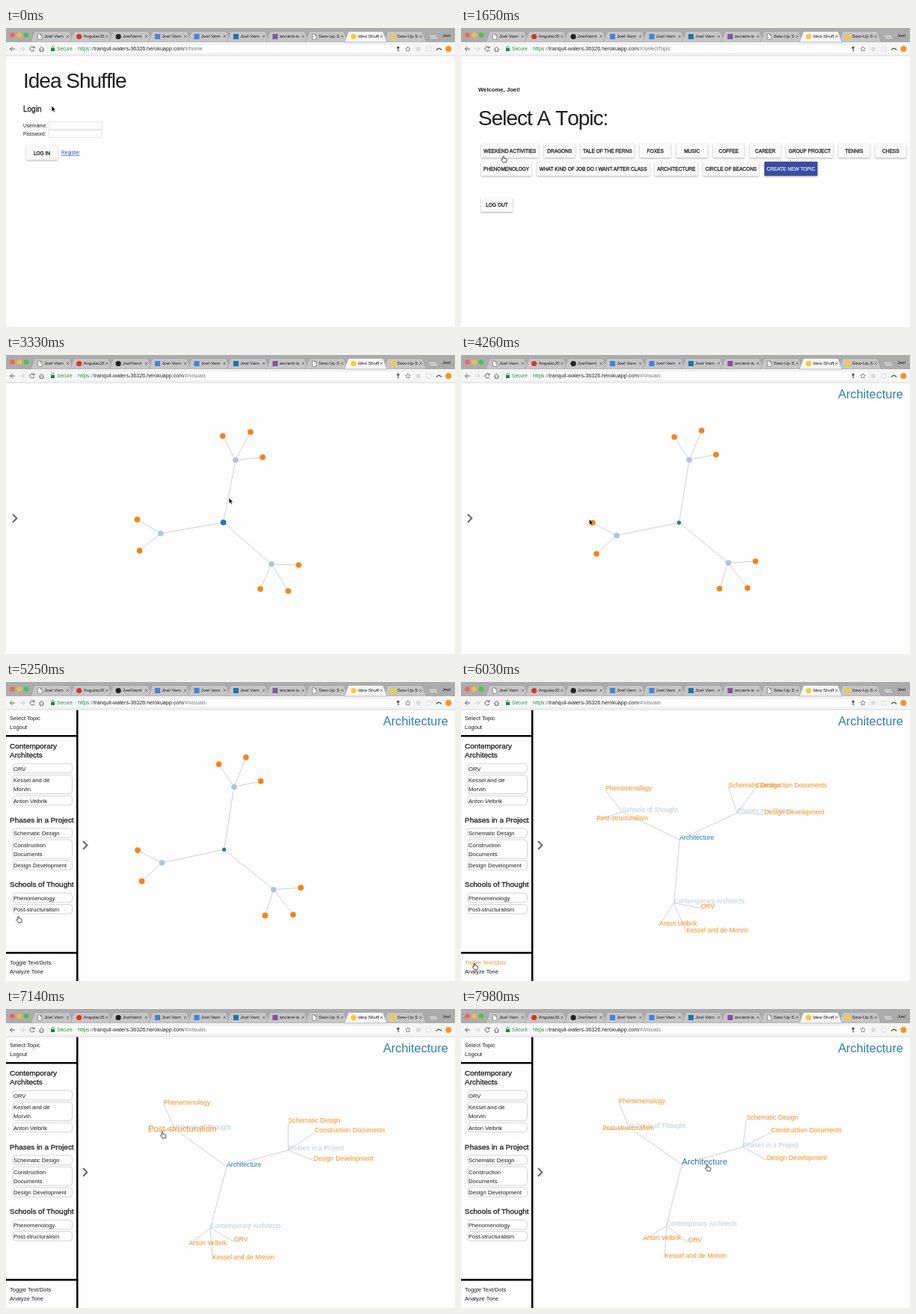
Recreate the animation shown at these times as an HTML page. Size 600 by 400 pixels, loop 8 s.

```html
<!DOCTYPE html>
<html lang="en">
<head>
<meta charset="utf-8">
<title>Idea Shuffle</title>
<style>
html, body { margin: 0; width: 100%; height: 100%; overflow: hidden; background: #fefefe; }
svg { font-family: "Liberation Sans", Arial, sans-serif; }
#stage { display: block; width: 100%; height: 100%; }
text { fill: #1e1e1e; white-space: pre; }
.medium { stroke: #1e1e1e; stroke-width: .28; }
.title { font-size: 28px; font-kerning: none; letter-spacing: -1px; }
.button { fill: #fafafa; filter: drop-shadow(0 1px 1px rgba(0, 0, 0, .32)); }
.button.primary { fill: #3a4ba2; }
.light { fill: #fefefe; stroke: #fefefe; stroke-width: .15; }
.box { fill: #fefefe; stroke: #c8c8c8; stroke-width: .8; }
.field { fill: #fefefe; stroke: #dedee2; stroke-width: .8; }
.icon { fill: none; stroke: #606060; stroke-width: 1; }
</style>
</head>
<body>
<svg id="stage" viewBox="0 0 600 400" preserveAspectRatio="none"></svg>
<script>
const LOOP = 8000;
const TOPICS = 1400, SHOW = 2490, PICK = 3640, OPEN = 4950, TOGGLE = 5700;
const stage = document.getElementById('stage');

// ---- markup helpers ----
const text = (x, y, size, str, attrs = '') =>
  `<text x="${x}" y="${y}" font-size="${size}" ${attrs}>${str}</text>`;
const rect = (x, y, w, h, attrs = '') =>
  `<rect x="${x}" y="${y}" width="${w}" height="${h}" ${attrs}/>`;
const circle = (x, y, r, fill) => `<circle cx="${x}" cy="${y}" r="${r}" fill="${fill}"/>`;
const path = (d, attrs = 'class="icon"') => `<path d="${d}" ${attrs}/>`;
const group = (id, body) => `<g id="${id}">${body}</g>`;

const ruler = document.createElement('canvas').getContext('2d');
ruler.font = '6.55px "Liberation Sans", Arial, sans-serif';

// Buttons flow from the left, each as wide as its label with a minimum.
function buttonRow(y, labels) {
  let x = 27;
  return labels.map(label => {
    const w = Math.max(42, ruler.measureText(label).width + 6.2), primary = label.startsWith('CREATE');
    const out = rect(x, y, w, 19, `rx="1" class="button ${primary ? 'primary' : ''}"`) +
      text(x + w / 2, y + 12.3, 6.55, label, `text-anchor="middle" class="${primary ? 'light' : 'medium'}"`);
    x += w + 7;
    return out;
  }).join('');
}

// ---- browser frame ----
const tabs = [
  ['Joel Varn', 'page'], ['AngularJS', 'dot', '#d8322e'], ['JoelVarnl', 'dot', '#222'],
  ['Joel Varn', 'square', '#4283e0'], ['Joel Varn', 'square', '#4283e0'],
  ['Joel Varn', 'square', '#1478ad'], ['ancient-is', 'square', '#7c5a9e'],
  ['Sew-Up Shed', 'page'], ['Idea Shuffle', 'dot', '#f2cf2c'], ['Sew-Up Shed', 'dot', '#f2cf2c']
];
const ACTIVE = 8;
const favicons = {
  page: () => path('M7.5 7.8h3.4l2 2v5.4H7.5zM10.9 7.8v2h2', 'fill="#fefefe" stroke="#707070" stroke-width=".7"'),
  dot: color => circle(10.3, 11.5, 3.6, color),
  square: color => rect(6.8, 8, 7, 7, `fill="${color}"`)
};

function tab(i) {
  const [label, shape, color] = tabs[i];
  return `<g transform="translate(${35 + i * 52.4} 0)">` +
    path('M-2 19L3 5.5Q3.5 4.5 5 4.5H48Q49.5 4.5 50 5.5L55 19Z',
      `fill="${i === ACTIVE ? '#f5f5f6' : '#c6c6c6'}" stroke="#969696" stroke-width=".6"`) +
    favicons[shape](color) +
    `<svg x="16" y="4" width="28" height="15">${text(0, 9.3, 6.2, label)}</svg>` +
    path('M46 9.8l3 3m0-3l-3 3', 'stroke="#555" stroke-width=".8"') + '</g>';
}

const browser = rect(0, 0, 600, 19, 'fill="#acacac"') +
  ['#f6625a', '#f3be3c', '#49c34b'].map((color, i) => circle(8.5 + 9.25 * i, 9.5, 3.3, color)).join('') +
  tabs.map((_, i) => i === ACTIVE ? '' : tab(i)).join('') +
  path('M564 8.5h11l3 7h-11z', 'fill="#c6c6c6" stroke="#969696" stroke-width=".6"') +
  text(583, 11.8, 6, 'Joel') +
  rect(0, 19, 600, 18, 'fill="#f5f5f6"') + tab(ACTIVE) +
  rect(0, 36.6, 600, .8, 'fill="#d0d0d0"') +
  rect(56, 21.8, 489, 12.4, 'rx="2" fill="#fefefe" stroke="#dcdcdc" stroke-width=".6"') +
  path('M12 28H5.5m3-3l-3 3 3 3') +
  path('M18.5 28H25m-3-3l3 3-3 3', 'fill="none" stroke="#ccc"') +
  path('M37.3 26A3 3 0 1 0 37.8 29M38 24.3v2.4h-2.4') +
  path('M44.3 28.3l3.2-3 3.2 3M45.4 28v3.2h4.2V28') +
  rect(60, 27, 5, 4, 'fill="#168a3a"') +
  path('M61 27v-1.2a1.5 1.5 0 0 1 3 0V27', 'fill="none" stroke="#168a3a" stroke-width=".9"') +
  text(68, 30.4, 6.6, 'Secure', 'style="fill:#168a3a"') +
  rect(92, 24, .6, 8, 'fill="#d4d4d4"') +
  '<text x="96" y="30.4" font-size="7.12"><tspan fill="#168a3a">https</tspan><tspan fill="#777">://</tspan>' +
  'tranquil-waters-36326.herokuapp.com<tspan id="address" fill="#777"></tspan></text>' +
  circle(524, 26.3, 1.7, '#555') + path('M524 27v4.5m0-1.5h1.5') +
  path('M537 24.6l1 2.2 2.4.3-1.8 1.6.5 2.4-2.1-1.2-2.1 1.2.5-2.4-1.8-1.6 2.4-.3z', 'fill="none" stroke="#606060" stroke-width=".7"') +
  circle(551, 28, 3, '#dcdce0') +
  rect(562, 25, 6, 6, 'fill="none" stroke="#ccc" stroke-dasharray="1 1"') +
  path('M575 29.5q3.5-4.5 7 0', 'fill="none" stroke="#456b3c" stroke-width="1.3"') +
  circle(591.3, 28, 4, '#f9951c');

// ---- pages ----
const login = text(23, 80, 28, 'Idea Shuffle', 'class="title"') +
  text(23, 112.3, 10, 'Login', 'class="medium"') +
  text(23, 133, 6.55, 'Username:') + rect(57.5, 125.5, 71, 10, 'class="field"') +
  text(23, 144, 6.55, 'Password:') + rect(56.5, 136.7, 71, 10, 'class="field"') +
  text(59.5, 133, 6.5, '', 'id="user"') + text(58.5, 144.3, 6.5, '', 'id="pass"') +
  buttonRow(157.5, ['LOG IN']) +
  text(74, 169.3, 6.58, 'Register', 'style="fill:#2450cc" text-decoration="underline"');

const topics = text(23, 84.7, 7.7, 'Welcome, Joel!', 'font-weight="bold"') +
  text(23, 130, 28, 'Select A Topic:', 'class="title"') +
  buttonRow(154.5, ['WEEKEND ACTIVITIES', 'DRAGONS', 'TALE OF THE FERNS', 'FOXES', 'MUSIC', 'COFFEE',
    'CAREER', 'GROUP PROJECT', 'TENNIS', 'CHESS']) +
  buttonRow(178.8, ['PHENOMENOLOGY', 'WHAT KIND OF JOB DO I WANT AFTER CLASS', 'ARCHITECTURE',
    'CIRCLE OF BEACONS', 'CREATE NEW TOPIC']) +
  buttonRow(227, ['LOG OUT']);

const ideas = [
  ['Contemporary Architects', ['ORV', 'Kessel and de Morvin', 'Anton Velbrik']],
  ['Phases in a Project', ['Schematic Design', 'Construction Documents', 'Design Development']],
  ['Schools of Thought', ['Phenomenology', 'Post-structuralism']]
];

// Breaks a long label before its last word.
const wrap = (str, max) => str.length > max ? str.split(/ (?=\S+$)/) : [str];

function outline() {
  const lineStep = 12.5;
  let y = 65.6, out = '';
  for (const [name, items] of ideas) {
    y += 22.9;
    wrap(name, 20).forEach((line, i) => {
      if (i) y += lineStep;
      out += text(5, y, 9.95, line, 'class="medium"');
    });
    y += 8.1;
    for (const label of items) {
      const lines = wrap(label, 18), h = lines.length * lineStep;
      out += rect(9, y, 79.5, h, 'rx="4" class="box"') +
        lines.map((line, i) => text(10, y + 9.5 + i * 12.2, 7.65, line)).join('');
      y += h + 2.8;
    }
    y -= 2.8;
  }
  return out;
}

const sidebar = rect(0, 37.4, 94, 363, 'fill="#fefefe"') +
  rect(94, 37.4, 2.5, 363) + rect(0, 71, 95, 2.4) + rect(0, 361, 95, 2.6) +
  text(5, 51, 7.6, 'Select Topic') + text(5, 63, 7.6, 'Logout') + outline() +
  text(5, 377.6, 7.5, 'Toggle Text/Dots', 'id="toggle"') + text(5, 389.6, 7.5, 'Analyze Tone');

// ---- idea graph: a centre, three hubs around it, leaves fanned out from each hub ----
const dotColors = ['#1f77b4', '#aec8d6', '#fd820e'];
const textColors = ['#2a7cac', '#bccbd2', '#f8901c'];
const nodes = [{ name: 'Architecture', level: 0 }];
ideas.forEach(([name, items], h) => {
  const hub = nodes.push({ name, level: 1, parent: 0, index: h }) - 1;
  items.forEach((item, index) =>
    nodes.push({ name: item, level: 2, parent: hub, index, count: items.length }));
});

const mix = (a, b, k) => a + (b - a) * k;
const progress = (t, a, b) => Math.min(1, Math.max(0, (t - a) / (b - a)));
const easeOut = k => 1 - (1 - k) ** 3;
const easeInOut = k => k * k * (3 - 2 * k);

// time, centre x, centre y, turn of the hubs, lean of the fans, scale
const dotPoses = [[SHOW, 290.5, 224, -130, 40, .25], [3330, 290.5, 224, -79, 17, 1], [5250, 291.5, 224.2, -81, 13, 1]];
const textPoses = [[TOGGLE, 292, 211, 65, -60, .35], [6030, 292, 211, 95, -28, 1],
  [7140, 295, 211, 105, -19, 1], [7980, 295, 208, 104, -11, 1]];

function poseAt(t, poses) {
  const next = poses.findIndex(pose => pose[0] > t);
  if (next < 0) return poses[poses.length - 1];
  const from = poses[next - 1], to = poses[next], k = easeOut(progress(t, from[0], to[0]));
  return from.map((v, i) => mix(v, to[i], k));
}

function spotsAt(t) {
  const words = t >= TOGGLE, side = words ? -1 : 1;
  const [, cx, cy, turn, lean, scale] = poseAt(t, words ? textPoses : dotPoses);
  const spots = [{ x: cx, y: cy, angle: turn }];
  for (const { level, parent, index, count } of nodes.slice(1)) {
    const base = spots[parent];
    let angle, reach;
    if (level === 1) {
      angle = turn + side * index * (index === 2 ? 124.5 : 120);
      reach = 85;
    } else {
      angle = base.angle + (count === 3 ? lean + (index - 1) * 56 : lean / 3 + (.5 - index) * 70);
      reach = count === 3 && index === 1 ? 42.5 : 36.5;
    }
    const rad = angle * Math.PI / 180;
    spots.push({ x: base.x + Math.cos(rad) * reach * scale, y: base.y + Math.sin(rad) * reach * scale, angle });
  }
  return spots;
}

// ---- pointer stops: arrival, departure, tip x, tip y, over something clickable ----
const stops = [
  [0, 30, 61, 104], [250, 540, 88, 128], [700, 1000, 66, 139], [1250, 1450, 48, 166, true],
  [1650, 1660, 56.5, 171, true], [2250, SHOW, 290, 187, true], [3330, 3340, 298, 191],
  [3600, 3900, 291, 222, true], [4700, 5000, 11, 216, true], [5200, 5270, 16.5, 313, true],
  [5550, 6570, 18, 376, true], [7120, 7380, 209, 164, true], [7850, LOOP, 329, 208, true]
];

function pointerAt(t) {
  const i = stops.findLastIndex(stop => t >= stop[0]);
  const from = stops[i], to = stops[i + 1] || from;
  const k = to === from ? 0 : easeInOut(progress(t, from[1], to[0]));
  const x = mix(from[2], to[2], k), y = mix(from[3], to[3], k);
  const near = k < .5 ? from : to;
  return { x, y, hand: !!near[4] && Math.hypot(x - near[2], y - near[3]) < 14 };
}

// ---- build once ----
stage.innerHTML = rect(0, 0, 600, 400, 'fill="#fefefe"') +
  group('login', login) + group('topics', topics) +
  group('visuals',
    group('edges', nodes.slice(1).map(() => '<line stroke="#ccc" stroke-width=".9"/>').join('')) +
    group('dots', nodes.map(n => circle(0, 0, 3.8, dotColors[n.level])).join('')) +
    group('labels', nodes.map(n => text(0, 0, 8.65, n.name, `style="fill:${textColors[n.level]}"`)).join('')) +
    text(504, 58, 16.3, 'Architecture', 'id="heading" style="fill:#2f80b0"') +
    group('sidebar', sidebar) +
    path('M9 213l5.3 5.4L9 223.8', 'id="chevron" fill="none" stroke="#666" stroke-width="2"')) +
  browser +
  path('M0 0V7.8L1.8 6.2 3 8.9 4.3 8.3 3.1 5.7H5.5Z', 'id="arrow" fill="#111" stroke="#fff" stroke-width=".5"') +
  path('M-.8 .8Q0-.4.8.8V3.2L4 4Q5 4.4 4.7 6L4 8.8H0L-2.6 5.4Q-2.4 3.8-.8 5Z', 'id="hand" fill="#fff" stroke="#222" stroke-width=".8"');

const el = id => document.getElementById(id);
const show = (id, on) => { el(id).style.display = on ? '' : 'none'; };
const move = (id, x, y) => el(id).setAttribute('transform', `translate(${x} ${y})`);
const set = (node, attrs) => { for (const key in attrs) node.setAttribute(key, attrs[key]); };
const edges = [...el('edges').children], dots = [...el('dots').children], labels = [...el('labels').children];

function drawGraph(t, pointer) {
  const spots = spotsAt(t), words = t >= TOGGLE;
  const hovered = spots.findLastIndex(({ x, y }, i) => words &&
    pointer.x > x && pointer.x < x + nodes[i].name.length * 4 && pointer.y > y - 8 && pointer.y < y + 4);
  show('dots', !words);
  show('labels', words);
  spots.forEach(({ x, y }, i) => {
    set(dots[i], { cx: x, cy: y, r: i === 0 && t >= PICK ? 2.6 : 3.8 });
    set(labels[i], { x, y, 'font-size': i === hovered ? 11.45 : 8.65 });
    if (i) {
      const hub = spots[nodes[i].parent];
      set(edges[i - 1], { x1: hub.x, y1: hub.y, x2: x, y2: y });
    }
  });
}

function draw(t) {
  const page = t < TOPICS ? 'login' : t < SHOW ? 'topics' : 'visuals';
  ['login', 'topics', 'visuals'].forEach(id => show(id, id === page));
  el('address').textContent = { login: '/#/home', topics: '/#/selectTopic', visuals: '/#/visuals' }[page];

  el('user').textContent = 'joel'.slice(0, Math.max(0, Math.floor((t - 300) / 90)));
  el('pass').textContent = '•'.repeat(Math.min(6, Math.max(0, Math.floor((t - 690) / 150))));

  const pointer = pointerAt(t);
  if (page === 'visuals') {
    drawGraph(t, pointer);
    show('heading', t >= PICK);
    const slide = easeInOut(progress(t, OPEN, 5200));
    show('sidebar', slide > 0);
    move('sidebar', -97 * (1 - slide), 0);
    move('chevron', 94 * slide, 0);
    el('toggle').style.fill = slide === 1 && pointer.x < 62 && pointer.y > 368 ? '#f8981c' : '';
  }
  show('hand', pointer.hand);
  show('arrow', !pointer.hand);
  move(pointer.hand ? 'hand' : 'arrow', pointer.x, pointer.y);
}

const start = performance.now();
function tick() {
  draw((performance.now() - start) % LOOP);
  requestAnimationFrame(tick);
}
tick();
</script>
</body>
</html>
```
